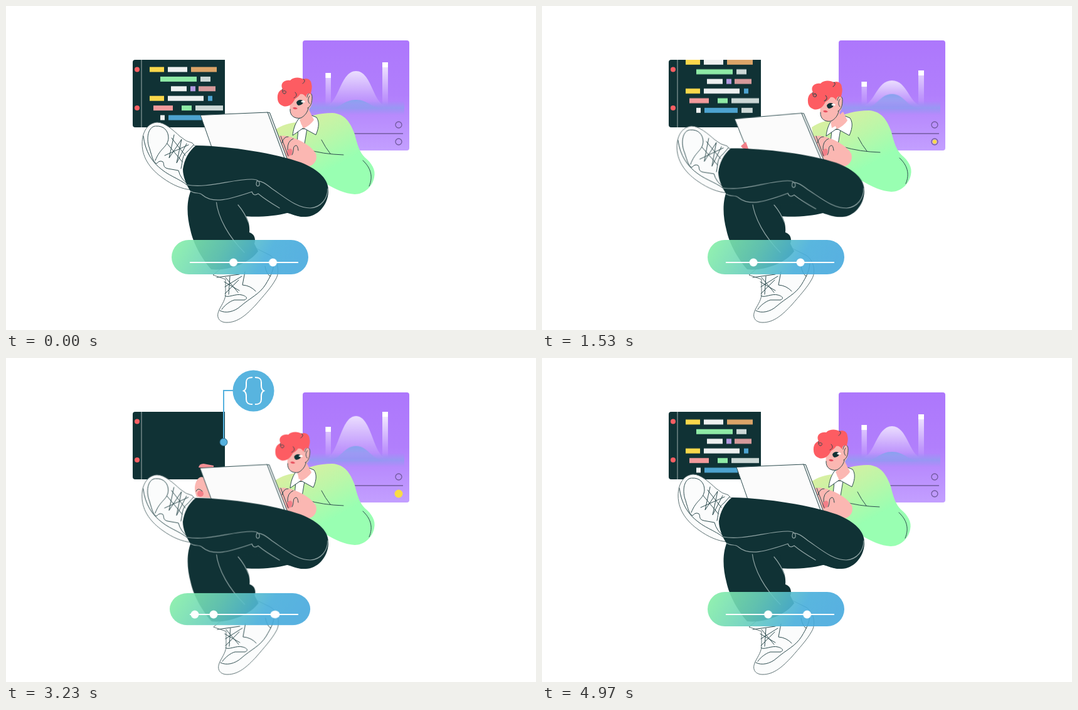
Recreate the animation shown at these times as an HTML page. Size 845x518 px, loop 5010 ms.

```html
<!DOCTYPE html>
<html lang="en">
<head>
<meta charset="utf-8">
<title>Coder with floating panels</title>
<style>
html, body { margin: 0; width: 100%; height: 100%; overflow: hidden; background: #fff; }
svg { display: block; width: 845px; height: 518px; }
.a { animation: 5010ms ease-in-out infinite; }
.pop { transform-box: fill-box; transform-origin: center; }
.ink { fill: none; stroke: #2b4a4d; stroke-width: 1; stroke-linecap: round; stroke-linejoin: round; }
.shoe { fill: #fbfcfc; stroke: #5b6f71; stroke-width: 1; stroke-linejoin: round; }
.seam { fill: none; stroke: #91a5a5; stroke-width: 1.2; stroke-linecap: round; }
.skin { fill: #fbb7b2; }
.nail { fill: #f27f88; }
.draw { fill: none; stroke-dasharray: 1 2; }

/* figure */
.head { animation-name: head; transform-origin: 478px 175px; }
@keyframes head {
  0%, 100% { transform: none; }
  18.6% { transform: translate(-5px, 2px); }
  30.5% { transform: translate(-9px, 5px); }
  47.3% { transform: translate(3px, -5px) rotate(9deg); }
  64.5% { transform: translate(-4px, 4px) rotate(1deg); }
  77.2% { transform: translate(8px, -2px) rotate(1deg); }
}
.hair { animation-name: hair; transform-origin: 470px 148px; }
@keyframes hair {
  0%, 30.5%, 64.5%, 100% { transform: none; }
  47.3% { transform: translate(2px, -4px) rotate(9deg) scale(1.08, .9); }
}
.collar { animation-name: collar; }
@keyframes collar {
  0%, 100% { transform: none; }
  18.6%, 30.5%, 64.5% { transform: translate(-4px, 1px); }
  47.3%, 77.2% { transform: translate(3px, 0); }
}
.torso { animation-name: torso; }
@keyframes torso {
  0%, 100% { transform: none; }
  18.6% { transform: translate(-4px, 0); }
  30.5% { transform: translate(1px, -4px); }
  47.3% { transform: translate(3px, 1px); }
  64.5% { transform: translate(0, -2px); }
  77.2% { transform: translate(-5px, 4px); }
}
.hand { animation-name: hand; }
@keyframes hand {
  0%, 64.5%, 100% { transform: none; }
  18.6% { transform: translate(-7px, 4px); }
  30.5% { transform: translate(-1px, 0); }
  47.3% { transform: translate(3px, -4px); }
  77.2% { transform: translate(-4px, 0); }
}
.lid { animation-name: lid; transform-origin: 446px 244px; }
@keyframes lid {
  0%, 100% { transform: none; }
  18.6%, 64.5%, 77.2% { transform: rotate(-.6deg); }
  30.5% { transform: rotate(-2.5deg); }
  47.3% { transform: rotate(-3.4deg); }
}
.grip { animation-name: grip; }
@keyframes grip {
  0%, 25%, 59%, 100% { transform: translate(22px, 36px); }
  30.5% { transform: translate(16px, 20px); }
  38%, 51% { transform: none; }
}
.rest { animation-name: rest; }
@keyframes rest {
  0%, 54%, 75%, 100% { transform: translate(28px, 12px); }
  60%, 66% { transform: none; }
}
.shin { animation-name: shin; transform-origin: 490px 300px; }
@keyframes shin {
  0%, 100% { transform: none; }
  18.6%, 64.5% { transform: rotate(-.2deg); }
  30.5% { transform: rotate(-1.4deg); }
  47.3% { transform: rotate(-6deg); }
  77.2% { transform: rotate(-.8deg); }
}
.calf { animation-name: calf; transform-origin: 350px 290px; }
@keyframes calf {
  0%, 30.5%, 38%, 66.5%, 95%, 100% { transform: none; }
  18.6% { transform: rotate(-4deg); }
  47.3% { transform: rotate(-2.7deg); }
  51.5% { transform: rotate(-4.4deg); }
  64.5% { transform: rotate(-.3deg); }
  77.2% { transform: rotate(-3.5deg); }
  82% { transform: rotate(-4.1deg); }
}

/* code panel */
.code { animation-name: scroll; animation-timing-function: linear; }
@keyframes scroll {
  0% { transform: none; animation-timing-function: ease-in-out; }
  18.6% { transform: translateY(-82px); }
  30.5% { transform: translateY(-109px); }
  47.3% { transform: translateY(-165px); }
  64.5%, 72% { transform: translateY(-220px); }
  72.01% { transform: translateY(29px); }
  77.2% { transform: translateY(24.5px); }
  100% { transform: none; }
}
.word { animation-name: type; transform-box: fill-box; transform-origin: left; }
@keyframes type {
  0% { transform: scaleX(0); animation-timing-function: cubic-bezier(.4, 0, .3, 1); }
  12%, 80% { transform: none; }
  80.01%, 100% { transform: scaleX(0); }
}

/* chart */
.bell { animation-name: bell; transform-origin: 558px 160px; }
@keyframes bell {
  0%, 100% { transform: none; }
  4% { transform: scaleY(1.2); }
  11% { transform: scaleY(.8); }
  18.6% { transform: scaleY(1.18); }
  30.5% { transform: scaleY(.73); }
  39% { transform: scaleY(1.15); }
  47.3% { transform: scaleY(.79); }
  64.5% { transform: scaleY(1.2); }
  77.2% { transform: scaleY(.84); }
  87% { transform: scaleY(1.15); }
  95% { transform: scaleY(.78); }
  99.2% { transform: scaleY(.91); }
}
.hill { animation-name: hill; transform-origin: 558px 166px; }
@keyframes hill {
  0%, 100% { transform: none; }
  18.6%, 30.5%, 64.5%, 77.2% { transform: scaleY(1.58); }
  47.3% { transform: scaleY(.93); }
}
.left { animation-name: left; }
@keyframes left {
  0%, 100% { transform: none; }
  18.6% { transform: translateY(10px); }
  30.5%, 77.2% { transform: translateY(14px); }
  47.3% { transform: translateY(1px); }
  64.5% { transform: translateY(3px); }
}
.right { animation-name: right; }
@keyframes right {
  0%, 100% { transform: none; }
  18.6% { transform: translateY(-2px); }
  30.5% { transform: translateY(13px); }
  47.3% { transform: translateY(6px); }
  64.5% { transform: translateY(-4px); }
  77.2% { transform: translateY(11px); }
}

/* slider */
.pill { animation-name: pill; }
@keyframes pill {
  0%, 62%, 67.5%, 100% { transform: none; }
  64.5% { transform: scale(1.028, .93); }
}
.bump { animation-name: bump; transform-origin: 0 410px; }
@keyframes bump {
  0%, 37%, 60%, 100% { transform: scaleY(0); }
  45%, 51% { transform: none; }
}
.knob { animation-timing-function: linear; }
.k1 { animation-name: k1; }
@keyframes k1 {
  0%, 10% { transform: translate(293px, 410px) scale(0); }
  12% { transform: translate(300px, 410px); }
  18.6% { transform: translate(319px, 410px); }
  30.5% { transform: translate(337px, 410px); }
  38% { transform: translate(350px, 410px); }
  45%, 47.3% { transform: translate(372px, 389px); }
  51% { transform: translate(384px, 389px); }
  59% { transform: translate(411px, 410px); }
  64.5% { transform: translate(429px, 410px) scale(1.15, .95); }
  72% { transform: translate(460px, 410px); }
  74%, 100% { transform: translate(466px, 410px) scale(0); }
}
.k2 { animation-name: k2; }
@keyframes k2 {
  0% { transform: translate(362.5px, 410px); }
  18.6% { transform: translate(393px, 410px); }
  30.5% { transform: translate(412px, 410px); }
  47.3% { transform: translate(439px, 410px); }
  58% { transform: translate(460px, 410px); }
  60% { transform: translate(466px, 410px) scale(0); }
  60.01%, 61.5% { transform: translate(293px, 410px) scale(0); }
  64.5% { transform: translate(301px, 410px); }
  77.2% { transform: translate(322.5px, 410px); }
  99.2% { transform: translate(360.5px, 410px); }
  100% { transform: translate(362.5px, 410px); }
}
.k3 { animation-name: k3; }
@keyframes k3 {
  0% { transform: translate(425.5px, 410px); }
  18.6% { transform: translate(458px, 410px); }
  22% { transform: translate(466px, 410px) scale(0); }
  22.01%, 52% { transform: translate(293px, 410px) scale(0); }
  54% { transform: translate(300px, 410px); }
  64.5% { transform: translate(331px, 410px); }
  77.2% { transform: translate(363px, 410px); }
  99.2% { transform: translate(422.5px, 410px); }
  100% { transform: translate(425.5px, 410px); }
}

/* call-outs */
.pin { animation-name: pin; }
@keyframes pin {
  0%, 41%, 83%, 100% { transform: scale(0); }
  44%, 80% { transform: none; }
}
.wire { animation-name: wire; }
@keyframes wire {
  0%, 43%, 72%, 100% { stroke-dashoffset: 1; }
  49.1%, 67% { stroke-dashoffset: 0; }
}
.badge { animation-name: badge; }
@keyframes badge {
  0%, 48%, 71%, 100% { transform: scale(0); }
  52% { transform: scale(1.33); }
  55.5% { transform: scale(.95); }
  58%, 64.5% { transform: none; }
  66.5% { transform: scale(1.09); }
}
.spot { animation-name: spot; }
@keyframes spot {
  0%, 28%, 70%, 100% { transform: scale(0); }
  30.5% { transform: scale(.5); }
  33%, 65% { transform: none; }
  47.3% { transform: scale(.86); }
}
.lead { animation-name: lead; }
@keyframes lead {
  0%, 33%, 57%, 100% { stroke-dashoffset: 1; }
  37%, 53% { stroke-dashoffset: 0; }
}
.alert { animation-name: alert; }
@keyframes alert {
  0%, 36%, 56%, 100% { transform: scale(0); }
  39% { transform: scale(1.12); }
  41%, 53% { transform: none; }
}
</style>
</head>
<body>
<svg viewBox="0 0 845 518">
  <defs>
    <linearGradient id="violet" x2="0" y2="1">
      <stop stop-color="#ad77fc"/><stop offset=".5" stop-color="#b17ffc"/><stop offset="1" stop-color="#c39fff"/>
    </linearGradient>
    <linearGradient id="mist" x2="0" y2="1">
      <stop stop-color="#fff" stop-opacity=".75"/><stop offset="1" stop-color="#fff" stop-opacity=".03"/>
    </linearGradient>
    <linearGradient id="water" x2="0" y2="1">
      <stop stop-color="#8f9df0" stop-opacity="0"/><stop offset=".5" stop-color="#8f9df0" stop-opacity=".75"/><stop offset="1" stop-color="#8f9df0" stop-opacity="0"/>
    </linearGradient>
    <linearGradient id="hillFill" x2="0" y2="1">
      <stop stop-color="#86a3ee"/><stop offset="1" stop-color="#8f9df0" stop-opacity=".2"/>
    </linearGradient>
    <linearGradient id="shirt" gradientUnits="userSpaceOnUse" x1="470" y1="180" x2="515" y2="262">
      <stop stop-color="#d6f0a2"/><stop offset=".45" stop-color="#bdf6a8"/><stop offset="1" stop-color="#99ffb2"/>
    </linearGradient>
    <linearGradient id="slide" x2="1" y2=".15">
      <stop stop-color="#88f2a5"/><stop offset=".4" stop-color="#6ad0bc"/><stop offset=".75" stop-color="#47aedb"/><stop offset="1" stop-color="#46a9dd"/>
    </linearGradient>
    <linearGradient id="fade" gradientUnits="userSpaceOnUse" x1="0" y1="95" x2="0" y2="160">
      <stop stop-color="#fff" stop-opacity=".95"/><stop offset="1" stop-color="#fff" stop-opacity="0"/>
    </linearGradient>
    <mask id="sink" maskUnits="userSpaceOnUse" x="500" y="60" width="120" height="100">
      <rect x="500" y="60" width="120" height="100" fill="url(#fade)"/>
    </mask>
    <clipPath id="screen"><rect x="202" y="86" width="147" height="108"/></clipPath>
  </defs>

  <!-- code panel -->
  <path d="M206 86H349V194H206Q202 194 202 190V90Q202 86 206 86Z" fill="#103235"/>
  <path d="M216 86V194" stroke="#8b9c9d" stroke-width="1.2"/>
  <g fill="#fd5f63"><circle cx="209" cy="101.500" r="4"/><circle cx="209" cy="163" r="4"/></g>
  <g clip-path="url(#screen)"><g id="code" class="a code"></g></g>

  <!-- chart panel -->
  <rect x="473" y="55" width="170" height="176" rx="4" fill="url(#violet)"/>
  <path class="a bell" d="M510 160C531 156 533 104 558 104S585 156 606 160Z" fill="url(#mist)"/>
  <g mask="url(#sink)" fill="#fff" fill-opacity=".85">
    <rect class="a left" x="509.500" y="107" width="8.500" height="80"/>
    <rect class="a right" x="600" y="90" width="9" height="90"/>
  </g>
  <g fill="#fff">
    <rect class="a left" x="509.500" y="107" width="8.500" height="8"/>
    <rect class="a right" x="600" y="90" width="9" height="8"/>
  </g>
  <rect x="475" y="152" width="160" height="22" fill="url(#water)"/>
  <path class="a hill" d="M510 166C534 164 538 150 558 150S582 164 606 166Z" fill="url(#hillFill)"/>
  <g fill="none" stroke="#715a9e" stroke-width="1.300">
    <circle cx="626" cy="190" r="5"/><path d="M540 204H633"/><circle cx="626" cy="217" r="5"/>
  </g>

  <!-- upper body -->
  <g class="a torso">
    <path d="M429 198C440 190 452 187 463 186C480 176 500 171 520 171C540 172 549 186 556 205C560 222 564 234 572 242C583 251 590 262 587 274C584 290 570 301 556 301C540 300 525 293 510 284L470 275L436 240Z" fill="url(#shirt)"/>
    <path class="ink" d="M569 247C581 258 586 272 579 288M503 214Q509 226 517 236M479 229Q505 237 538 238"/>
  </g>
  <g class="a collar">
    <path d="M466 197L480 196L476 220L464 218Z" fill="#fff" stroke="#2b4a4d"/>
    <path d="M466 181L480 172L495 178C499 184 500 192 494 206L474 195L457 207C458 198 460 190 466 181Z" fill="#fff" stroke="#2b4a4d" stroke-linejoin="round"/>
    <path class="skin" d="M468 182L484 168L491 182Q486 190 474 196Z"/>
  </g>
  <g class="a head">
    <path class="skin" d="M454 146C452 158 452 166 454 172C457 179 464 180 469 179L471 190L488 181L483 165C488 160 489 152 488 144C487 137 482 137 479 143L474 134Z"/>
    <path class="ink" d="M453 165C452 175 460 181 470 179C476 176 481 170 482 163M480 146C481 137 488 137 488 146C488 154 486 161 481 163M484 144C481 148 481 153 484 156" stroke-width=".9"/>
    <path d="M463 154C465 149 472 149 474 152C475 155 471 159 466 159Q463 157 463 154Z" fill="#103235"/>
    <path d="M470 153Q474 149 477 153Q474 156 470 153Z" fill="#fff"/>
    <path d="M457 163Q461 160 465 164Q460 167 457 163Z" fill="#e8515f"/>
    <g class="a hair">
      <path d="M433 148C432 139 437 134 441 133C436 124 444 117 453 119C459 113 469 114 474 117C481 114 487 119 487 125C489 131 486 137 486 141C482 138 479 140 478 146C476 142 473 140 469 141C465 147 461 147 460 150C456 158 449 162 442 160C436 158 433 153 433 148Z" fill="#fd5c62"/>
      <path class="ink" d="M441 133C440 138 442 141 445 140C448 138 446 134 442 136M474 117C478 118 476 122 473 124M459 147C463 145 465 142 461 138" stroke-width=".8"/>
    </g>
  </g>
  <g class="a hand">
    <path class="skin" d="M426 212C436 205 450 207 461 212C475 217 488 226 494 236C497 246 492 254 482 257C470 261 455 256 446 248Z"/>
    <ellipse class="nail" cx="452" cy="234" rx="4.500" ry="6" transform="rotate(20 452 234)"/>
    <path class="ink" d="M440 219Q443 208 450 209M449 230Q448 216 458 212M456 238C460 232 456 225 462 223Q465 222 466 231M438 208L450 240" stroke-width=".9"/>
  </g>

  <!-- laptop and left hand -->
  <g class="a rest">
    <path class="skin" d="M304 196C308 189 315 188 320 196L330 224L304 222C300 212 300 204 304 196Z"/>
    <path d="M307 175Q308 169 315 169L331 172V178Z" fill="#f58e94"/>
    <ellipse class="nail" cx="310" cy="217" rx="5" ry="5"/>
    <path class="ink" d="M303 213Q306 206 313 213" stroke-width=".8"/>
  </g>
  <g class="a lid" stroke-linejoin="round">
    <path d="M416 170L420.500 170.500L449 246L441 244Z" fill="#e8ecec" stroke="#2b4a4d"/>
    <path d="M310 174.500L417 170L445 246L333 240Z" fill="#fbfbfb" stroke="#2b4a4d"/>
  </g>
  <g class="a grip">
    <path class="skin" d="M305 210C312 206 322 210 330 214C336 216 337 221 334 223C342 225 342 232 336 234C342 239 338 245 329 244L314 243C316 236 311 232 308 228C304 223 303 216 305 210Z"/>
    <path class="nail" d="M301 204L309 197L314 211Q305 210 301 204Z"/>
    <g class="nail"><ellipse cx="328" cy="219" rx="6.500" ry="4"/><ellipse cx="333" cy="229" rx="6.500" ry="4"/><ellipse cx="332" cy="238.500" rx="6.500" ry="4"/></g>
    <path class="ink" d="M310 215Q320 221 334 223M311 224Q322 232 336 234M314 234Q320 240 330 243" stroke-width=".8"/>
  </g>

  <!-- standing leg -->
  <path d="M300 297L480 300L478 337C462 338 455 330 448 331C430 336 400 338 378 336L330 332Z" fill="#103235"/>
  <g class="a calf">
    <path class="shoe" d="M330 430L350 437L350 462C349 472 342 480 339 488C335 498 340 506 352 506C370 506 384 493 398 478C410 464 423 450 430 437C438 424 432 404 420 398L400 388L352 412Z"/>
    <path class="ink" d="M341 487C350 492 364 489 374 480C390 466 404 461 414 445C421 433 426 425 427 412M349 463C352 468 367 459 376 462C384 464 386 468 380 470L364 470C357 472 349 478 344 485M381 425L377 446Q390 447 398 456M413 416Q415 428 421 432" stroke="#5b6f71"/>
    <path class="ink" d="M336 434L372 429M348 441L372 455M349 449L376 432M349 460L371 438M350 434L370 458M357 432L355 461" stroke="#5b6f71"/>
    <path d="M297 290C287 310 288 335 294 358C299 382 314 406 327 421C352 424 388 412 402 392L396 380C399 371 395 364 388 362C389 350 386 342 381 332L380 300Z" fill="#103235"/>
    <path class="seam" d="M335 311C338 340 356 370 380 394M370 318Q381 331 387 347"/>
  </g>

  <!-- crossed leg -->
  <g class="a shin">
    <path class="shoe" d="M241 186C253 186 266 198 278 209Q287 217 297 219Q300 224 303 224L292 244L290 262L296 294C281 293 265 286 250 275C233 263 217 245 217 220C217 201 226 187 241 186Z"/>
    <path class="ink" d="M219 208C222 233 233 250 249 262C264 274 282 278 295 292M238 192C226 193 223 213 229 228C233 242 235 250 240 252Q245 246 250 249C253 252 249 258 258 260L275 263Q278 276 290 285M239 192C252 191 259 200 259 211C258 226 246 226 238 247M299 222L290 232C280 239 282 248 279 260" stroke="#5b6f71"/>
    <path class="ink" d="M268 206L260 243L280 213L272 251L288 220M253 239L291 222M257 220L281 249M264 211L286 239" stroke="#5b6f71"/>
    <path d="M303 223C360 224 430 236 470 250C500 262 515 278 514 297C513 320 495 337 478 337C465 337 455 333 447 330L405 315L340 314C325 313 317 308 313 302C305 298 298 300 294 296C287 285 282 272 282 261C284 246 291 232 303 223Z" fill="#103235"/>
    <path class="seam" d="M289 286C320 292 360 277 392 277C402 277 405 281 404 286C402 290 397 288 400 280C407 279 414 284 424 292C446 307 464 323 485 323C503 322 513 307 513 292M294 296C302 301 308 297 313 302C330 317 357 309 392 297Q395 305 402 300Q414 310 436 323"/>
  </g>

  <!-- slider -->
  <rect class="a pill pop" x="264" y="374" width="218" height="55" rx="27.500" fill="url(#slide)" fill-opacity=".9"/>
  <g fill="none" stroke="#fff" stroke-width="2.200">
    <path d="M293 410H466"/>
    <path class="a bump" vector-effect="non-scaling-stroke" d="M332 410C348 410 338 389 352 389H389C403 389 393 410 409 410"/>
  </g>
  <g fill="#fff">
    <circle class="a knob k1" r="6.500"/><circle class="a knob k2" r="6.500"/><circle class="a knob k3" r="6.500"/>
  </g>

  <!-- braces call-out -->
  <path class="a draw wire" pathLength="1" d="M347 134V52H364" stroke="#55b1de" stroke-width="2"/>
  <circle class="a pin pop" cx="347" cy="134.500" r="6" fill="#55b1de" stroke="#2f6d8b"/>
  <g class="a badge pop">
    <circle cx="394.500" cy="52.500" r="33" fill="#58b4df"/>
    <path d="M393 31C385 31 383 34 383 39V44C383 49 382 51 379 52.500C382 54 383 56 383 61V66C383 71 385 74 393 74M397 31C405 31 407 34 407 39V44C407 49 408 51 411 52.500C408 54 407 56 407 61V66C407 71 405 74 397 74" fill="none" stroke="#fff" stroke-width="2"/>
  </g>

  <!-- warning call-out -->
  <g stroke="#f8da48">
    <path class="a draw lead" pathLength="1" d="M626 217V305" stroke-width="1.200"/>
    <path class="a draw lead" pathLength="1" d="M625.500 304V348.500H588" stroke-width="2"/>
  </g>
  <circle class="a spot pop" cx="626" cy="217" r="6.500" fill="#f9dc45"/>
  <g class="a alert pop">
    <path d="M575 320.500L606.500 375.500H543.500Z" fill="#f9dc45" stroke="#f9dc45" stroke-width="3" stroke-linejoin="round"/>
    <path d="M570 338Q575 333 580 338L577 360Q575 363 573 360Z" fill="#fff"/>
    <circle cx="575" cy="368.500" r="3.600" fill="#fff"/>
  </g>
</svg>
<script>
const hue = { y: '#fbd84b', w: '#eef1f1', o: '#dba468', g: '#8eeaa6', s: '#ccd8d6',
  l: '#b39ae0', r: '#d69a9b', b: '#4da3d0', p: '#f39a9b' };
// each word: colour, left edge, width
const rows = [
  'y229,23 w258,31 o295,41',
  'g246,58 s310,16',
  'w263,25 l294,8 r307,27',
  'y229,23 w258,57 b322,7',
  'p235,31 g280,16 s302,44',
  'w246,7 b259,53 s318,18'
];
const code = document.getElementById('code');

function addBlock(top, start) {
  rows.forEach((row, i) => row.split(' ').forEach((word, j) => {
    const [x, w] = word.slice(1).split(',');
    const rect = document.createElementNS('http://www.w3.org/2000/svg', 'rect');
    const attrs = { class: 'a word', x, y: top + i * 15.4, width: w, height: 8, fill: hue[word[0]] };
    for (const name in attrs) rect.setAttribute(name, attrs[name]);
    rect.style.animationDelay = start + i * 100 + j * 50 - 5010 + 'ms';
    code.append(rect);
  }));
}
addBlock(97.5, 3620);
addBlock(195, 410);
</script>
</body>
</html>
```
